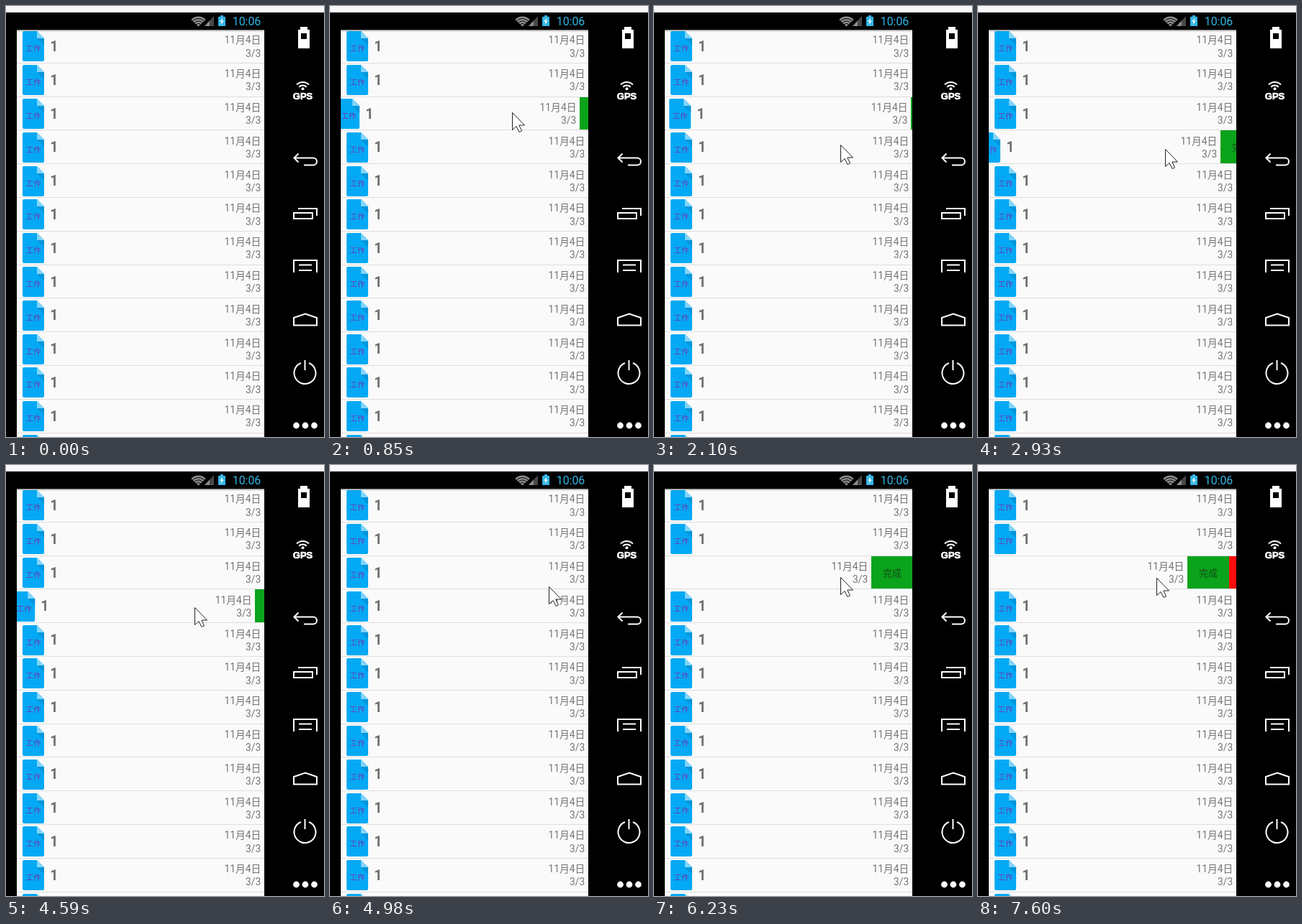
An HTML page with a canvas that plays this animation: 442x600 px, repeating every 8 s.

```html
<!DOCTYPE html>
<html lang="zh">
<head>
<meta charset="utf-8">
<title>Swipe list</title>
<style>
html, body { margin: 0; width: 100%; height: 100%; overflow: hidden; background: #000; }
canvas { display: block; }
</style>
</head>
<body>
<canvas id="stage" width="442" height="600"></canvas>
<script>
const ctx = document.getElementById('stage').getContext('2d');
const LOOP = 8000;
const LEFT = 15, RIGHT = 359, TOP = 33, PITCH = 46.8, BUTTON = 58;
const FONT = 'Roboto, "Noto Sans CJK SC", "Noto Sans CJK JP", "Noto Sans CJK", sans-serif';

// Each gesture moves the pointer to (x, y) and slides a row to the distance `swipe`.
// lead: share of the gesture the slide takes; sway: detour of the pointer to the left.
const gestures = [
  { start: 70, end: 300, steps: 4, x: 275, y: 143 },
  { start: 540, end: 620, steps: 2, x: 284, y: 147 },
  { start: 850, end: 1570, steps: 10, x: 271, y: 187, swipe: 115, lead: 0.5, sway: 70 },
  { start: 1790, end: 2410, steps: 9, x: 282, y: 197, lead: 0.6, sway: 31 },
  { start: 2620, end: 2930, steps: 5, x: 260, y: 199, swipe: 22, row: 3 },
  { start: 4590, end: 5210, steps: 9, x: 319, y: 159, lead: 0.25, row: 3 },
  { start: 5440, end: 5610, steps: 3, x: 305, y: 157, swipe: 13.5 },
  { start: 5850, end: 6230, steps: 6, x: 259, y: 156, swipe: 57 },
  { start: 7450, end: 7600, steps: 3, x: 248, y: 157, swipe: 68 }
];

const lerp = (a, b, u) => a + (b - a) * u;
const ease = u => u >= 1 ? 1 : u * u * (3 - 2 * u);

function poseAt(t) {
  let pose = { x: 324, y: 484, swipe: 0, row: 2, visible: false };
  for (const { start, end, steps, x, y, swipe = 0, lead = 1, sway = 0, row = 2 } of gestures) {
    if (t < start) break;
    const frame = Math.floor((t - start + 4) / (end - start) * (steps - 1));
    const p = Math.min(1, (frame + 1) / steps);
    const detour = sway * Math.max(0, Math.sin(Math.PI * p / 0.7));
    pose = {
      x: lerp(pose.x, x, ease(p)) - detour,
      y: lerp(pose.y, y, ease(p)),
      swipe: lerp(pose.swipe, swipe, ease(p / lead)),
      row,
      visible: true
    };
  }
  return pose;
}

function rect(color, x, y, w, h) {
  ctx.fillStyle = color;
  ctx.fillRect(x, y, w, h);
}

function trace(points, close) {
  ctx.beginPath();
  points.forEach(([x, y]) => ctx.lineTo(x, y));
  if (close) ctx.closePath();
}

function fillShape(color, points) {
  trace(points, true);
  ctx.fillStyle = color;
  ctx.fill();
}

function line(points, close) {
  trace(points, close);
  ctx.stroke();
}

function disc(x, y, r) {
  ctx.beginPath();
  ctx.arc(x, y, r, 0, Math.PI * 2);
  ctx.fill();
}

function arc(x, y, r, from, to) {
  ctx.beginPath();
  ctx.arc(x, y, r, from * Math.PI, to * Math.PI);
  ctx.stroke();
}

function text(str, x, y, font, color, align = 'left') {
  ctx.font = font;
  ctx.fillStyle = color;
  ctx.textAlign = align;
  ctx.fillText(str, x, y);
}

function drawNote(x, y) {
  const w = 30, h = 42, fold = 10;
  ctx.fillStyle = '#03a9f4';
  ctx.beginPath();
  ctx.moveTo(x + 2, y);
  ctx.lineTo(x + w - fold, y);
  ctx.lineTo(x + w, y + fold);
  ctx.arcTo(x + w, y + h, x, y + h, 2);
  ctx.arcTo(x, y + h, x, y, 2);
  ctx.arcTo(x, y, x + w, y, 2);
  ctx.fill();
  fillShape('#0296da', [[x + w - fold, y + fold], [x + w, y + fold], [x + w, y + 2 * fold]]);
  fillShape('#81d4fa', [[x + w - fold, y], [x + w, y + fold], [x + w - fold, y + fold]]);
  text('工作', x + 15, y + 28.3, '10.5px ' + FONT, '#6a3ab2', 'center');
}

function drawRow(index, offset) {
  const y = TOP + index * PITCH, x = -offset;
  const top = Math.round(y), bottom = Math.round(y + PITCH - 1);
  drawNote(x + 23, Math.round(y + 2.3));
  text('1', x + 61.2, y + 30, 'bold 19.5px ' + FONT, '#6f6f6f');
  text('11月4日', x + 354.4, y + 19.3, '13.8px ' + FONT, '#757575', 'right');
  text('3/3', x + 354.2, y + 37.6, '13.8px ' + FONT, '#757575', 'right');
  if (offset > 0) {
    const green = Math.round(RIGHT - offset), red = green + BUTTON;
    rect('#0aa31b', green, top, BUTTON, bottom - top);
    rect('#ff0b0b', red, top, BUTTON, bottom - top);
    text('完成', green + 29, y + 28, '13px ' + FONT, '#174a1a', 'center');
    text('删除', red + 32, y + 28, '13px ' + FONT, '#5c1212', 'center');
  }
  rect('#dedede', LEFT, bottom, RIGHT - LEFT, 1);
}

function drawList(active, offset) {
  ctx.save();
  ctx.beginPath();
  ctx.rect(LEFT, TOP, RIGHT - LEFT, 600 - TOP);
  ctx.clip();
  rect('#fafafa', LEFT, TOP, RIGHT - LEFT, 600);
  for (let i = 0; i < 13; i++) drawRow(i, i === active ? offset : 0);
  for (let i = 0; i < 3; i++) rect(`rgba(0,0,0,${0.45 / 2.5 ** i})`, LEFT, TOP + i, RIGHT - LEFT, 1);
  ctx.restore();
}

function drawStatus() {
  const gray = '#8c8c8c';
  ctx.fillStyle = gray;
  ctx.beginPath();
  ctx.moveTo(267.5, 28.5);
  ctx.arc(267.5, 28.5, 14, Math.PI * 1.24, Math.PI * 1.76);
  ctx.fill();
  ctx.strokeStyle = '#000';
  ctx.lineWidth = 1;
  for (let r = 4; r < 13; r += 3.5) arc(267.5, 28.5, r, 1.2, 1.8);
  fillShape('#474747', [[289, 14], [289, 28], [276, 28]]);
  fillShape(gray, [[283, 20.5], [283, 28], [276, 28]]);
  rect('#33b5e5', 298, 13, 4, 2);
  rect('#33b5e5', 295, 15, 10, 13);
  fillShape('#e6f6fc', [[301, 16.5], [297, 22], [299.5, 22], [298.5, 26.5], [303, 20.5], [300.5, 20.5]]);
  text('10:06', 314.8, 27, '15.8px ' + FONT, '#33b5e5');
}

function drawSidebar() {
  const white = '#fff';
  ctx.strokeStyle = white;

  rect(white, 409, 29, 10, 4);
  rect(white, 406, 33, 16, 26);
  rect('#000', 410, 38, 8, 8);

  text('GPS', 398.8, 129.5, 'bold 13px "Liberation Sans", Arial, sans-serif', white);
  ctx.lineWidth = 0.7;
  ctx.strokeText('GPS', 398.8, 129.5);
  ctx.lineWidth = 2;
  arc(412.5, 118, 12, 1.25, 1.75);
  arc(412.5, 118, 7.5, 1.25, 1.75);
  disc(412.5, 115.3, 2);

  line([[406.5, 205.5], [400.5, 211.5], [406.5, 217.5]]);
  ctx.beginPath();
  ctx.moveTo(400.5, 211.5);
  ctx.lineTo(427, 211.5);
  ctx.arc(427, 216.5, 5, -Math.PI / 2, Math.PI / 2);
  ctx.lineTo(414, 221.5);
  ctx.stroke();

  ctx.strokeRect(400, 288, 26, 8);
  line([[406, 282], [432, 282], [432, 292]]);

  line([[400, 371], [400, 354], [432, 354], [432, 371]]);
  for (const y of [360.5, 368]) line([[407, y], [425, y]]);

  line([[400, 444.5], [400, 434], [416, 428.5], [432, 434], [432, 444.5]], true);

  arc(415.5, 511, 15, -0.38, 1.38);
  line([[415.5, 493], [415.5, 507]]);

  for (let i = -1; i < 2; i++) disc(416 + i * 12.5, 584, 4.4);
}

function drawPointer(x, y) {
  const shape = [[0, 0], [0, 24], [5.5, 19], [9.5, 27], [13, 25.3], [9.3, 17.5], [17, 17.5]]
    .map(([dx, dy]) => [x + dx + 0.5, y + dy + 0.5]);
  fillShape('#fff', shape);
  ctx.strokeStyle = '#222';
  ctx.lineWidth = 1;
  line(shape, true);
}

function draw(t) {
  const { x, y, swipe, row, visible } = poseAt(t);
  rect('#000', 0, 0, 442, 600);
  rect('#f8f8fb', 0, 0, 442, 9);
  drawList(row, swipe);
  drawStatus();
  drawSidebar();
  if (visible) drawPointer(Math.round(x), Math.round(y));
}

const begin = performance.now();
function tick() {
  draw((performance.now() - begin) % LOOP);
  requestAnimationFrame(tick);
}
tick();
</script>
</body>
</html>
```
